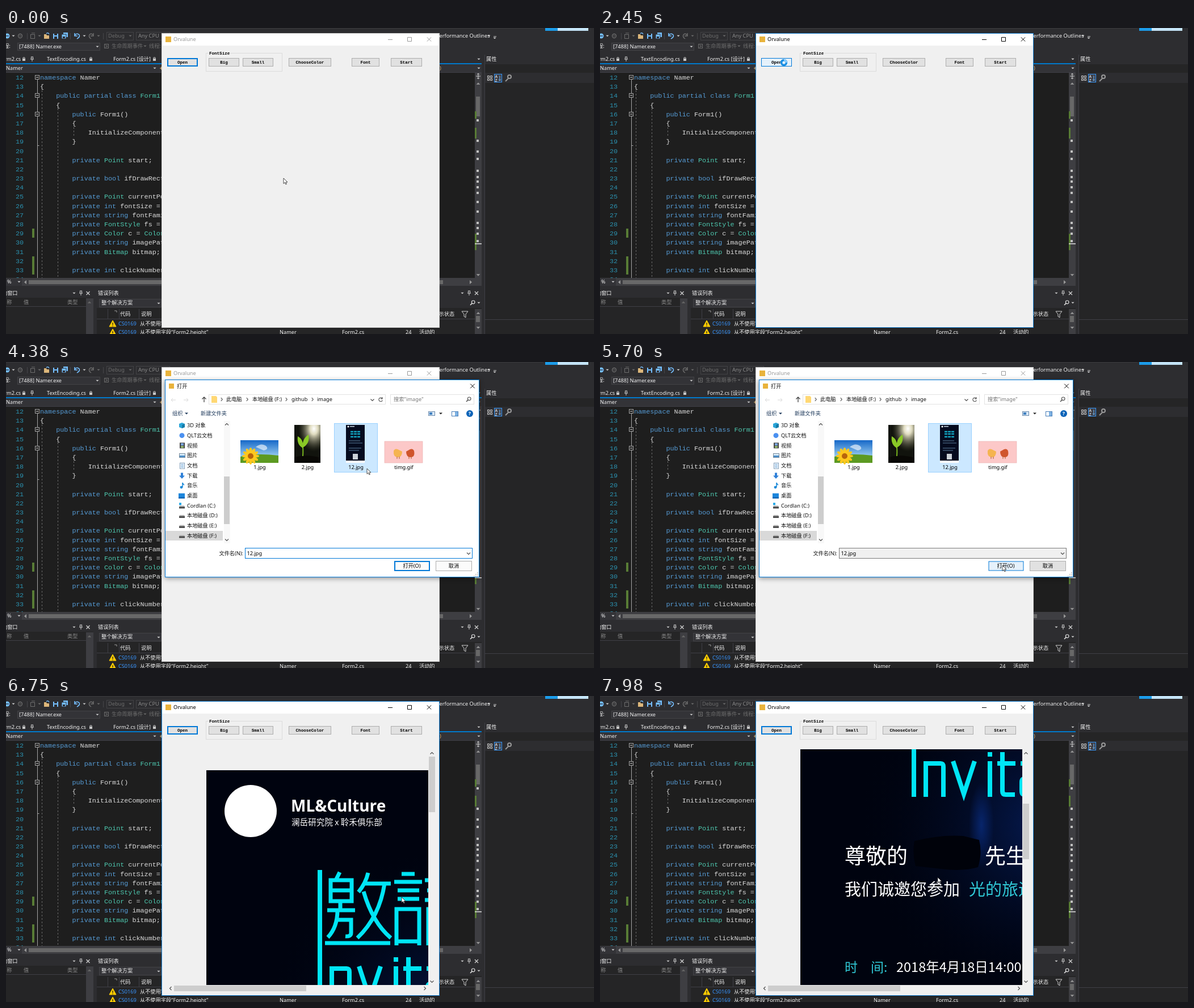
Recreate the animation shown at these times as an HTML page. Size 1036 px wide and 540 px high, loop 8000 ms.

```html
<!DOCTYPE html>
<html lang="zh">
<head>
<meta charset="utf-8">
<style>
html, body { margin: 0; width: 100%; height: 100%; overflow: hidden; background: #2d2d30; }
svg { display: block; width: 1036px; height: 540px; }
text { font-family: "Noto Sans", "Noto Sans CJK SC", "Noto Sans CJK", sans-serif; white-space: pre; }
.code { font: 11.77px "Liberation Mono", monospace; }
.btn { font: bold 7.55px "Liberation Mono", monospace; }
.cjk { font-family: "Noto Sans CJK SC", "Noto Sans CJK", "Noto Sans", sans-serif; }
</style>
</head>
<body>
<script>
const esc = s => s.replace(/&/g, '&amp;').replace(/</g, '&lt;');
const rect = (x, y, w, h, fill, more = '') =>
  `<rect x="${x}" y="${y}" width="${w}" height="${h}" fill="${fill}" ${more}/>`;
const box = (x, y, w, h, fill, line, sw = 1, more = '') =>
  rect(x + sw / 2, y + sw / 2, w - sw, h - sw, fill, `stroke="${line}" stroke-width="${sw}" ${more}`);
const text = (x, y, s, fill = '#f1f1f1', size = 9.2, more = '') =>
  `<text x="${x}" y="${y + size * .36}" fill="${fill}" font-size="${size}" ${more}>${esc(s)}</text>`;
const line = (d, stroke, w = 1, more = '') =>
  `<path d="${d}" fill="none" stroke="${stroke}" stroke-width="${w}" ${more}/>`;
const shape = (d, fill, more = '') => `<path d="${d}" fill="${fill}" ${more}/>`;
const dot = (x, y, r, fill, more = '') => `<circle cx="${x}" cy="${y}" r="${r}" fill="${fill}" ${more}/>`;
const down = (x, y, c = '#d0d0d0', s = 2.6) => shape(`M${x - s} ${y - s / 2}h${2 * s}l${-s} ${s}z`, c);
const up = (x, y, c = '#999', s = 3.4) => shape(`M${x - s} ${y + s / 2}h${2 * s}l${-s} ${-s}z`, c);
const cross = (x, y, r, c, w = 1) => line(`M${x - r} ${y - r}l${2 * r} ${2 * r}m0 ${-2 * r}l${-2 * r} ${2 * r}`, c, w);
const chevron = (x, y, dx, dy, c = '#505050', w = 1.2) => dy
  ? line(`M${x - 3} ${y - dy * 1.5}l3 ${dy * 3}l3 ${-dy * 3}`, c, w)
  : line(`M${x - dx * 1.5} ${y - 3}l${dx * 3} 3l${-dx * 3} 3`, c, w);
const pin = (x, y) => line(`M${x - 2} ${y - 4}h4m-3.5 0v4m3 0v-4m-4.5 4h6m-3 0v4`, '#d0d0d0');
const lens = (x, y, c) => line(`M${x - 4} ${y + 4}l3.4 -3.4`, c, 1.6) +
  dot(x + 1.2, y - 1.2, 2.8, 'none', `stroke="${c}" stroke-width="1.2"`);
const lock = (x, y) => rect(x - 2, y - 1, 5, 4, '#c8c8c8') + line(`M${x - 1} ${y - 1}v-2h3v2`, '#c8c8c8');
const group = (id, body, more = '') => `<g id="${id}" ${more}>${body}</g>`;

const KEY = '#569cd6', TYPE = '#4ec9b0', INK = '#dcdcdc', BLUE = '#0078d7';
const rowY = n => 87 + (n - 12) * 16.19;

const code = {
  12: [0, 'namespace Namer'], 13: [0, '{'], 14: [4, 'public partial class Form1 : Form'], 15: [4, '{'],
  16: [8, 'public Form1()'], 17: [8, '{'], 18: [12, 'InitializeComponent();'], 19: [8, '}'],
  21: [8, 'private Point start;'], 23: [8, 'private bool ifDrawRect;'], 25: [8, 'private Point currentPoint;'],
  26: [8, 'private int fontSize = 9;'], 27: [8, 'private string fontFamily;'], 28: [8, 'private FontStyle fs = 0;'],
  29: [8, 'private Color c = Color.Black;'], 30: [8, 'private string imagePath;'],
  31: [8, 'private Bitmap bitmap;'], 33: [8, 'private int clickNumber;']
};

function paint(src, n) {
  return esc(src).split(/(\w+)/).map(w => {
    let c = INK;
    if (/^(namespace|public|partial|class|private|bool|int|string)$/.test(w)) c = KEY;
    else if (/^(Point|FontStyle|Color|Bitmap)$/.test(w) || (w === 'Form1' && n === 14)) c = TYPE;
    return w && `<tspan fill="${c}">${w}</tspan>`;
  }).join('');
}

function editor() {
  let s = rect(0, 79, 826, 362, '#1e1e1e');
  for (let n = 12; n <= 34; n++) {
    const y = rowY(n) + 4;
    s += `<text class="code" x="17" y="${y}" fill="#2b91af">${n}</text>`;
    if (code[n]) s += `<text class="code" x="${60 + code[n][0] * 7.06}" y="${y}">${paint(code[n][1], n)}</text>`;
  }
  s += line('M55.5 91V441M55.5 207.5h3', '#a5a5a5');
  s += line('M63.5 110V441M91.5 142V441M119.5 175V192', '#6a6a6a', 1, 'stroke-dasharray="3 3"');
  [12, 14, 16].forEach(n => {
    const y = Math.round(rowY(n)) - 4;
    s += box(51, y, 8, 8, '#1e1e1e', '#a5a5a5') + line(`M53 ${y + 4}h4`, '#e0e0e0');
  });
  s += rect(46, 354, 4, 16, '#587c35') + rect(46, 403, 4, 32, '#587c35');
  s += rect(826, 79, 12, 362, '#3e3e42') + line('M828 85h8m-4 -5v10m-2 -8l2 -2l2 2m-4 6l2 2l2 -2', '#d0d0d0');
  s += up(832, 98) + down(832, 436, '#999', 3.4) + rect(828, 121, 7, 35, '#686868');
  [[147, 13], [176, 19], [363, 29]].forEach(([y, h]) => s += rect(826, y, 3, h, '#587c35'));
  [163, 199, 218, 231, 252, 263, 271, 281, 291, 307, 324, 344, 353, 363, 376]
    .forEach(y => s += rect(829, y - 2, 4, 4, '#c0c0c0'));
  s += rect(826, 380, 12, 1.5, '#e0e0e0');
  s += rect(0, 441, 838, 14, '#3e3e42') + rect(0, 442, 28, 13, '#333337') + text(2, 448, '%') + down(23, 448);
  s += shape('M36 445v7l-4 -3.5z', '#999') + rect(40, 445, 730, 7, '#686868') + shape('M817 445v7l4 -3.5z', '#999');
  return s;
}

function toolbars() {
  const G = '#6d6d6d', S = '#75bfff';
  let s = dot(2, 14, 4.5, S) + line('M-1 14h6', '#2d2d30', 1.3) + down(13, 14) + dot(25, 14, 3.5, 'none', `stroke="${G}" stroke-width="1.3"`);
  s += line('M23 14h4', G) + box(43, 11, 8, 8, 'none', G) + line('M45 9h6', G) + down(59, 14, G);
  s += shape('M67 11h4l1 2h4v6h-9z', '#dcb67a') + line('M71 10q3 -3 5 1', S, 1.3);
  s += rect(83, 10, 9, 9, S) + rect(85, 10, 5, 3, '#2d2d30') + rect(85, 15, 5, 4, '#2d2d30');
  s += rect(101, 8, 8, 8, S) + rect(98, 11, 8, 8, S, 'stroke="#2d2d30"') + rect(100, 15, 4, 3, '#2d2d30');
  s += line('M121 9v5h5M121 13q4 -5 8 -1q2 4 -4 7', S, 1.6) + down(138, 14) + line('M154 9v5h-5M154 13q-4 -5 -7 -1q-2 4 3 7', G, 1.4) + down(163, 14, G);
  s += line('M37.5 9v11M113.5 9v11M171.5 9v11', '#46464a');
  s += box(177, 7, 48, 15, '#2d2d30', '#434346') + text(180, 14, 'Debug', G) + down(219, 14, G);
  s += box(229, 7, 60, 15, '#2d2d30', '#434346') + text(233, 14, 'Any CPU', '#8a8a8a');
  s += text(758, 14, 'Performance Outlines') + down(851, 14) + line('M859 15h5', '#d0d0d0') + down(861, 18);
  s += text(-13, 32, '进程:') + box(20, 26, 146, 14, '#333337', '#434346') + text(23, 32.5, '[7488] Namer.exe') + down(161, 33);
  s += box(173, 28, 8, 8, 'none', G) + line('M175 30l4 2l-4 2', G) + text(186, 32, '生命周期事件', G) + down(245, 32, G) + text(252, 32, '线程:', G);
  s += text(-13, 54.5, 'Form2.cs') + lock(31, 55) + pin(46, 55) + text(72, 54.5, 'TextEncoding.cs') + lock(149, 55);
  s += text(189, 54.5, 'Form2.cs [设计]') + lock(261, 55) + down(833, 55) + rect(0, 62, 838, 2, '#007acc');
  s += rect(0, 64, 838, 15, '#333337') + text(0, 70.5, 'Namer') + down(262, 71) + line('M271 71h5m-2.5 -2.5v5', '#dcb67a');
  s += text(764, 70.5, ')', '#dcb67a') + down(833, 71) + line('M0 78.5H838', '#3f3f46');
  s += rect(950, 0, 22, 5, '#1c9be8') + rect(972, 0, 54, 5, '#c4e4f7') + rect(0, 0, 946, 1, '#3a3a3d');
  return s;
}

function panels() {
  const W = '#1e1e1e', G = '#8a8a8a';
  let s = rect(843, 47, 193, 493, '#252526') + rect(843, 47, 193, 17, '#2d2d30') + text(846, 55, '属性');
  s += rect(843, 79, 193, 18, '#2d2d30') + line('M843 514.5H1036M843.5 47V540', '#3f3f46');
  [[848, 84], [848, 89], [853, 84], [853, 89]].forEach(([x, y]) => s += box(x, y, 4, 4, 'none', '#c8c8c8'));
  s += box(860, 81, 14, 15, '#3f3f46', '#3399ff') + text(861.5, 85, 'A', '#fff', 7) + text(861.5, 92, 'Z', '#fff', 7) + line('M870 84v9m-2 -2l2 2l2 -2', '#75bfff');
  s += line('M880 94l5 -5', '#999', 2) + dot(887, 86, 3, 'none', 'stroke="#999" stroke-width="2"');
  s += rect(0, 461, 154, 79, '#252526') + rect(0, 461, 154, 15, '#2d2d30') + text(-7, 468, '动窗口');
  s += down(120, 468) + pin(132, 468) + cross(144.5, 468, 3, '#d0d0d0', 1.3);
  s += text(-8, 484, '名称', G) + text(31, 484, '值', G) + text(108, 484, '类型', G) + rect(141, 477, 13, 63, '#3e3e42') + up(147, 484, '#666') + line('M0 491.5h141', '#3f3f46');
  s += rect(160, 461, 678, 79, '#252526') + rect(160, 461, 678, 33, '#2d2d30') + text(162, 468, '错误列表');
  s += down(804, 468) + pin(816, 468) + cross(829, 468, 3, '#d0d0d0', 1.3);
  s += box(164, 478, 110, 15, '#333337', '#434346') + text(168, 485, '整个解决方案') + down(269, 486) + lens(822, 485, '#e0e0e0') + down(833, 485);
  s += line('M160 513.5H826M179.5 496V513M199.5 496V513M234.5 496V513', '#3f3f46') + text(201, 505, '代码') + text(238, 505, '说明') + text(735, 505, '禁止显示状态');
  s += shape('M803 500h11l-4 5v6l-3 -2v-4z', 'none', 'stroke="#d0d0d0"') + line('M191 499h4v3', '#999');
  [522, 537].forEach(y => {
    s += shape(`M188 ${y - 6}l6 11h-12z`, '#ffcc00', 'stroke="#ffcc00" stroke-linejoin="round"') + rect(187.4, y - 2, 1.3, 4, W) + rect(187.4, y + 3, 1.3, 1.3, W);
    s += text(198, y, 'CS0169', '#3794ff') + text(236, y, '从不使用字段“Form2.height”');
  });
  s += text(482, 537, 'Namer') + text(592, 537, 'Form2.cs') + text(704, 537, '24') + text(728, 537, '活动的');
  s += rect(826, 496, 12, 44, '#3e3e42') + up(832, 503) + rect(828, 508, 7, 11, '#686868') + down(832, 529, '#999', 3.4);
  return s;
}

const button = (x, w, s) => box(x, 53, w, 15, '#e1e1e1', '#adadad') +
  `<text class="btn" x="${x + w / 2}" y="63.3" text-anchor="middle" fill="#000">${s}</text>`;

function poster() {
  const C = '#00e5f5', CJK = 'class="cjk" font-weight="500"';
  let s = rect(353, 131, 800, 1530, '#00030f') + rect(353, 131, 800, 1530, 'url(#glow)') + rect(353, 131, 800, 1530, 'url(#ray)');
  s += dot(431, 203, 46, '#fff');
  s += text(502, 194, 'ML&Culture', '#fff', 28, 'font-weight="600"') + text(503, 222.5, '澜岳研究院 x 聆禾俱乐部', '#fff', 14.6, CJK);
  s += rect(549, 307, 8, 233, C);
  // 邀
  s += line('M588 311l-6 12M572 362V325H609V362zM572 343H609M589 362V376M566 378H615M584 378Q584 408 567 426M584 395H608V418Q608 425 598 424', C, 7);
  s += line('M638 312Q634 330 621 346M632 331H678M667 331Q658 390 619 427M630 345Q646 400 678 427M562 436H677', C, 7);
  // 請
  s += line('M697 314H720M684 328H733M690 343H728M690 358H728M688 440V376H728V440M688 433H728', C, 7);
  s += line('M738 325H800M742 343H796M738 360H800M744 440V376H792V440M744 396H792M744 414H792M768 310V360', C, 7);
  s += line('M574 540V481H600Q605 481 605 487V540M622 477L641 535L660 477M687 477V540M687 461V469M709 461V530Q709 536 715 536H731M700 481H732', C, 8);
  s += line('M741 481H768V536H748Q743 536 743 530V514Q743 508 748 508H768', C, 8);
  s += text(431, 645, '尊敬的', '#fff', 37, CJK) + text(678, 645, '先生', '#fff', 37, CJK);
  s += shape('M554 618Q600 606 640 609L668 616Q674 640 666 664Q640 672 600 667L556 662Q550 640 554 618', '#00020a');
  s += text(431, 704, '我们诚邀您参加', '#fff', 29, CJK) + text(650, 704, '光的旅途', '#30c8d6', 29, CJK);
  s += text(431, 841, '时', '#30c8d6', 23, CJK) + text(477, 841, '间:', '#30c8d6', 23, CJK) + text(522, 841, '2018年4月18日14:00', '#fff', 23.5, CJK);
  return s;
}

function mainWindow() {
  let s = rect(274, 9, 489, 520, '#f0f0f0') + rect(275, 10, 488, 21, '#fff');
  s += rect(281, 15, 10, 10, '#e9b33c') + text(295, 19.5, 'Orvalune', 'currentColor');
  s += line('M673 20.5h8M707.5 16.5h7v7h-7z', 'currentColor') + cross(745.5, 20, 3.6, 'currentColor');
  s += box(352, 44, 135, 33, 'none', '#dcdcdc') + rect(357, 42, 38, 5, '#f0f0f0') + '<text class="btn" x="358" y="46.5">FontSize</text>';
  s += button(284, 54, 'Open') + box(284, 53, 54, 15, 'none', BLUE, 2, 'id="openEdge"');
  s += group('openHot', button(284, 54, 'Open').replace('#e1e1e1', '#e5f1fb').replace('#adadad', BLUE));
  s += button(357, 54, 'Big') + button(417, 54, 'Small') + button(498, 75, 'ChooseColor') + button(609, 49, 'Font') + button(678, 55, 'Start');
  s += group('view', `<g clip-path="url(#pane)">${group('page', poster())}</g>` +
    chevron(750.5, 101, 0, -1) + chevron(750.5, 504, 0, 1) + chevron(290, 516, -1, 0) + chevron(738, 516, 1, 0) +
    rect(296, 511, 233, 10, '#cdcdcd') + rect(745, 107, 11, 98, '#cdcdcd', 'id="thumb"'));
  return s + box(274, 9, 490, 520, 'none', '#b4b4b4', 1, 'id="edge"');
}

const navNames = ['3D 对象', 'QLT云文档', '视频', '图片', '文档', '下载', '音乐', '桌面', 'Cordlan (C:)', '本地磁盘 (D:)', '本地磁盘 (E:)', '本地磁盘 (F:)'];
const disk = (x, y) => shape(`M${x - 4} ${y - 1}h8l1 2h-10z`, '#b0b0b0') + rect(x - 5, y + 1, 10, 3, '#444');
const navIcons = [
  (x, y) => shape(`M${x} ${y - 5}l5 2v6l-5 2l-5 -2v-6z`, '#2aa5d8') + shape(`M${x} ${y - 1}l5 -2v6l-5 2z`, '#167ba8'),
  (x, y) => dot(x, y, 4.5, '#4a90f0'),
  (x, y) => rect(x - 4, y - 5, 9, 10, '#444') + rect(x - 2, y - 4, 5, 4, '#7aa7e0') + rect(x - 2, y + 1, 5, 3, '#9ac070'),
  (x, y) => box(x - 5, y - 4, 11, 8, '#d8ecfa', '#7a8a99') + rect(x - 4, y, 9, 3, '#4c8ec8'),
  (x, y) => box(x - 4, y - 5, 9, 11, '#fff', '#7a9ab8') + line(`M${x - 2} ${y - 2}h5m-5 2.5h5m-5 2.5h5`, '#5a9bd5'),
  (x, y) => shape(`M${x - 2} ${y - 5}h4v5h3l-5 5.5l-5 -5.5h3z`, '#2f80d8'),
  (x, y) => dot(x - 1, y + 3, 2.4, '#1c8ad8') + line(`M${x + 1} ${y + 3}v-8q1 3 3 4`, '#1c8ad8', 1.6),
  (x, y) => rect(x - 6, y - 4, 11, 9, '#1c86dc') + rect(x - 6, y + 3, 11, 2, '#0c5fae'),
  (x, y) => disk(x, y + 1) + rect(x - 5, y - 5, 4, 4, '#20a8e8'), disk, disk, disk
];

function thumbs() {
  let s = rect(413, 138, 67, 40, 'url(#sky)') + shape('M413 167Q440 160 480 165V178H413z', '#5c9a22') +
    shape('M440 150q10 -8 18 -2q6 6 -4 8z', '#fff', 'opacity=".6"');
  for (let i = 0; i < 12; i++) s += `<ellipse cx="431" cy="157" rx="2.6" ry="6" fill="#ffc81e" transform="rotate(${i * 30} 431 166)"/>`;
  s += dot(431, 166, 5, '#b8640c');
  s += rect(508, 111, 46, 67, '#11130d') + rect(508, 111, 46, 67, 'url(#sun)') + shape('M508 168Q530 162 554 169V178H508z', '#090805');
  s += line('M523 166Q524 153 522 143', '#78b41e', 2) + shape('M523 152Q512 146 514 131Q525 137 523 152M523 151Q521 136 533 128Q536 144 523 151', '#8ac926');
  s += rect(599, 111, 33, 67, '#050b1e') + dot(603, 114, 1.6, '#fff') + rect(606, 113, 8, 1.5, '#c8d4e0');
  s += line('M607 123h18m-18 4h18m-18 5h18', '#13a3bf', 2.4, 'stroke-dasharray="5 1"') + line('M604 139h20m-20 4h24m-24 9h22m-22 4h18', '#5c7f9c', 1);
  s += rect(611, 162, 9, 10, '#ccd2d8') + rect(599, 174, 33, 4, '#fff');
  s += rect(667, 140, 67, 38, '#fcc8c8', 'stroke="#e8b0b0" stroke-width=".6"');
  s += shape('M683 157q2 -5 7 -3l8 4q0 10 -8 10t-7 -11z', '#f5b450') + shape('M719 157q-2 -5 -7 -3l-7 4q0 10 8 10t6 -11z', '#d0552c');
  s += line('M689 167v4m4 -4v4M710 167v4m4 -4v4', '#b05a28');
  [[447, '1.jpg'], [531.5, '2.jpg'], [616.5, '12.jpg'], [701, 'timg.gif']].forEach(([x, n]) => s += text(x, 186, n, '#000', 9.2, 'text-anchor="middle"'));
  return s;
}

function dialog() {
  const K = '#111', M = 'text-anchor="middle"';
  let s = box(280, 31, 554, 349, '#fff', BLUE, 1, 'style="filter:drop-shadow(0 2px 4px rgba(0,0,0,.4))"');
  s += rect(287, 38, 9, 9, '#e9b33c') + text(301, 42.5, '打开', K) + cross(822, 42.5, 3.8, '#000');
  s += line('M291 67h8m-5 -3l-3 3l3 3M313 67h8m-3 -3l3 3l-3 3', '#d8d8d8') + line('M349 71v-9m-3.5 3.5l3.5 -3.5l3.5 3.5', '#444', 1.3);
  s += box(357, 57, 312, 18, '#fff', '#e2e2e2') + box(677, 57, 148, 18, '#fff', '#e2e2e2') + shape('M362 60h8l2 2v10h-10z', '#ffd874');
  [380, 425, 494, 540].forEach(x => s += chevron(x, 66, .8, 0));
  [[388, '此电脑'], [434, '本地磁盘 (F:)'], [503, 'github'], [548, 'image']].forEach(([x, n]) => s += text(x, 66, n, K));
  s += chevron(645.5, 67, 0, 1) + line('M662.5 64a3.3 3.3 0 1 0 .8 3.5M663 62v3h-3', '#505050', 1.1);
  s += text(683, 66, '搜索"image"', '#767676') + lens(815, 66, '#555');
  s += text(293, 91, '组织', '#1e395b') + down(318, 91, '#1e395b', 3) + text(343, 91, '新建文件夹', '#1e395b');
  s += box(744, 87, 12, 8, '#d8e8f6', '#6a88aa') + rect(746, 89, 5, 4, '#4080c0') + down(766, 91, '#222', 3);
  s += box(785, 87, 12, 9, '#fff', '#4a7fb8') + rect(791, 88, 5, 7, '#7db2e4') + dot(817, 91, 6, '#0b63b8') + text(817, 91, '?', '#fff', 9, M + ' font-weight="700"');
  s += rect(281, 298, 101, 17, '#d9d9d9');
  navNames.forEach((n, i) => { const y = 112 + i * 17.68; s += navIcons[i](310, y) + text(319, y, n, K); });
  s += rect(384, 104, 11, 216, '#f8f8f8') + chevron(389, 110, 0, -1) + chevron(389, 314, 0, 1) + rect(384, 202, 10, 84, '#cdcdcd');
  s += box(578, 108, 77, 87, '#e5f3ff', '#e5f3ff', 1, 'id="pick"') + thumbs();
  s += text(418, 337.5, '文件名(N):', K, 9.2, 'text-anchor="end"') + box(421, 328, 401, 19, '#fff', BLUE, 1, 'id="field"') + chevron(815, 338, 0, 1);
  s += `<g clip-path="url(#entry)">` + rect(424, 331, 63, 14, BLUE, 'id="mark"') +
    text(486, 338, 'openFileDialog1', '#fff', 9.2, 'id="oldName" text-anchor="end"') + text(424.5, 338, '12.jpg', '#000', 9.2, 'id="newName"') + '</g>';
  s += box(684, 351, 63, 18, '#fbfbfb', BLUE, 2, 'id="ok"') + text(715, 360, '打开(O)', '#000', 9.2, M);
  s += box(757, 351, 64, 18, '#fbfbfb', '#adadad', 1, 'id="cancel"') + text(789, 360, '取消', '#000', 9.2, M);
  [[831, 372], [828, 375], [831, 375], [825, 378], [828, 378], [831, 378]].forEach(([x, y]) => s += rect(x - 1, y - 1, 1.5, 1.5, '#b0b0b0'));
  return s;
}

const defs = `<defs>
<clipPath id="pane"><rect x="352" y="94" width="392" height="416"/></clipPath>
<clipPath id="entry"><rect x="424" y="329" width="380" height="17"/></clipPath>
<linearGradient id="sky" x2="0" y2="1"><stop stop-color="#1668c8"/><stop offset=".8" stop-color="#a8d8f4"/></linearGradient>
<radialGradient id="sun" cx=".75" cy=".1" r=".6"><stop stop-color="#fff"/><stop offset=".25" stop-color="#e0dcc0"/><stop offset="1" stop-color="#55553c" stop-opacity="0"/></radialGradient>
<radialGradient id="glow" gradientUnits="userSpaceOnUse" cx="780" cy="590" r="330"><stop stop-color="#051a50"/><stop offset="1" stop-color="#00030f" stop-opacity="0"/></radialGradient>
<radialGradient id="ray" gradientUnits="userSpaceOnUse" cx="0" cy="0" r="1" gradientTransform="translate(672 590) scale(22 75)"><stop stop-color="#0a2f86" stop-opacity=".7"/><stop offset="1" stop-color="#0a2f86" stop-opacity="0"/></radialGradient>
</defs>`;

const arrow = shape('M0 0V9.6L2.3 7.5L3.9 11L5.4 10.3L3.9 7H7z', '#fff', 'stroke="#222" stroke-width=".8"');
const busy = dot(324, 61, 4.4, 'none', 'stroke="#1a8fe3" stroke-width="3.6"') + line('M324 56.6a4.4 4.4 0 0 1 4.4 4.4', '#8fd0ff', 3);

document.body.innerHTML = `<svg viewBox="0 0 1036 540">${defs}${rect(0, 0, 1036, 540, '#2d2d30')}` +
  editor() + toolbars() + panels() + group('win', mainWindow()) + group('dlg', dialog()) +
  group('wait', busy) + group('mouse', arrow) + '</svg>';

const el = {};
document.querySelectorAll('svg [id]').forEach(e => el[e.id] = e);
const show = (id, on) => el[id].setAttribute('visibility', on ? 'inherit' : 'hidden');
const style = (id, fill, stroke, w = 1) => {
  el[id].setAttribute('fill', fill);
  el[id].setAttribute('stroke', stroke);
  el[id].setAttribute('stroke-width', w);
};

// time, then values held until the next row
const moves = [
  [0, 489, 265], [680, 460, 200], [810, 424, 126], [950, 405, 113], [1080, 380, 98], [1190, 360, 84], [1310, 347, 76],
  [1460, 335, 66], [1580, 324, 61], [3110, 343, 87], [3260, 375, 170], [3390, 399, 262], [3540, 520, 200], [3660, 597, 156],
  [4080, 595, 154], [4380, 636, 188], [4500, 690, 288], [4650, 740, 325], [4770, 765, 348], [4920, 760, 353],
  [5040, 735, 356], [5190, 715, 360], [5340, 709, 359], [6480, 697, 355], [7020, 640, 320], [7150, 601, 302],
  [7300, 598, 300], [7730, 600, 298], [7980, 595, 320]
];
const fades = [[0, 0], [2720, .35], [2840, .75], [2960, 1], [6480, .4], [6600, 0]];
const scrolls = [[0, 0, 0], [7450, 120, 28], [7580, 362, 83]];
const at = (rows, t) => rows.filter(r => r[0] <= t).pop();

function draw(t) {
  const within = (a, b) => t >= a && t < b;
  const [, x, y] = at(moves, t), [, fade] = at(fades, t), [, shift, thumb] = at(scrolls, t);
  el.mouse.setAttribute('transform', `translate(${x} ${y})`);
  show('wait', within(2450, 2960));
  show('mouse', !within(2450, 2960));

  const active = within(2450, 2570) || t >= 6600;
  el.win.style.color = active ? '#000' : '#999';
  el.edge.setAttribute('stroke', active ? '#1883d7' : '#d0d0d0');
  show('openHot', within(1580, 6480));
  show('view', t >= 6750);
  el.page.setAttribute('transform', `translate(0 ${-shift})`);
  el.thumb.setAttribute('y', 107 + thumb);

  show('dlg', fade > 0);
  el.dlg.setAttribute('opacity', fade);
  const picked = t >= 4230;
  show('pick', t >= 3540);
  style('pick', picked ? '#cce8ff' : '#e5f3ff', picked ? '#99d1ff' : '#e5f3ff');
  show('mark', t < 3660);
  show('oldName', !picked);
  el.oldName.setAttribute('fill', t < 3660 ? '#fff' : '#000');
  show('newName', picked);
  style('field', t < 4770 ? '#fff' : '#f0f0f0', t < 4770 ? BLUE : '#7a7a7a');
  style('ok', t < 5040 ? '#fbfbfb' : '#e5f1fb', BLUE, t < 5040 ? 2 : 1);
  const hot = within(4920, 5040);
  style('cancel', hot ? '#e5f1fb' : t < 4920 ? '#fbfbfb' : '#e1e1e1', hot ? BLUE : '#adadad');
}

function tick() {
  draw(performance.now() % 8000);
  requestAnimationFrame(tick);
}
tick();
</script>
</body>
</html>
```
